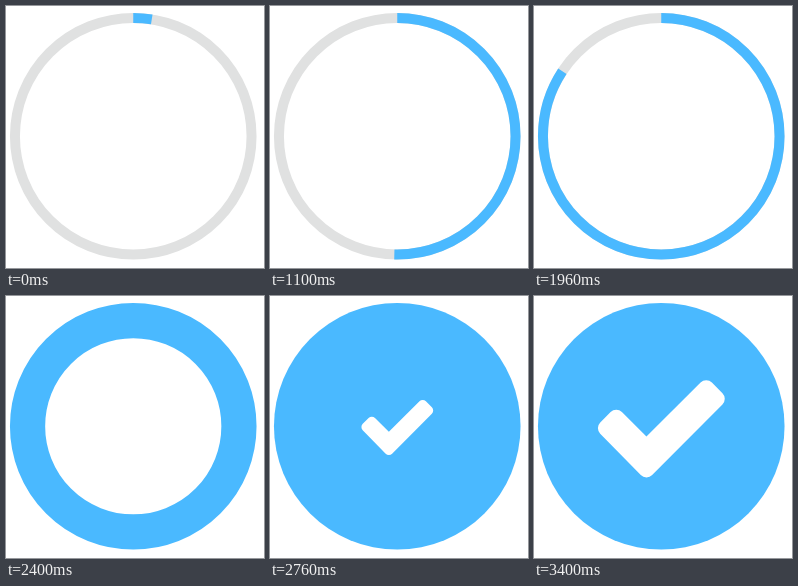
An HTML page with a canvas that plays this animation: 258 px wide and 262 px high, repeating every 3.42 s.

```html
<!DOCTYPE html>
<html lang="en">
<head>
<meta charset="utf-8">
<title>Progress ring</title>
<style>
  html, body { margin: 0; width: 100%; height: 100%; overflow: hidden; background: #fff; }
  canvas { display: block; }
</style>
</head>
<body>
<canvas id="stage" width="258" height="262"></canvas>
<script>
const ctx = document.getElementById('stage').getContext('2d');
const LOOP = 3420, STEP = 20;
const CX = 127.25, CY = 130.25, RADIUS = 123.3, LINE = 10;
const BLUE = '#4ab9ff', GRAY = '#e0e1e1';

// Corners relative to the scaling origin; the last one is the sharp inner angle.
const CHECK = [[-45, -19.4], [-66.6, 2.2], [-14.8, 55], [66.8, -27], [45, -49], [-14.8, 10.6]];
const CORNER = 8;

const clamp = x => Math.min(1, Math.max(0, x));
const phase = (t, start, end) => clamp((t - start) / (end - start));
const mix = (a, b, k) => a + (b - a) * k;
const easeOut = k => Math.sin(k * Math.PI / 2);
const easeInOut = k => (1 - Math.cos(k * Math.PI)) / 2;

// Two half turns with a short rest between them.
function sweep(t) {
  return t < 1090 ? mix(9, 180, phase(t, 0, 1070)) : mix(180, 360, phase(t, 1090, 2360));
}

function checkScale(t) {
  return t < 2980
    ? 1.2 * easeOut(phase(t, 2660, 2980))
    : mix(1.2, 1, easeInOut(phase(t, 2980, 3200)));
}

function ring(color, degrees, thickness) {
  const start = -Math.PI / 2;
  ctx.beginPath();
  ctx.arc(CX, CY, RADIUS - thickness / 2, start, start + degrees * Math.PI / 180);
  ctx.lineWidth = thickness;
  ctx.strokeStyle = color;
  ctx.stroke();
}

function disc() {
  ctx.beginPath();
  ctx.arc(CX, CY, RADIUS, 0, Math.PI * 2);
  ctx.fillStyle = BLUE;
  ctx.fill();
}

function check(scale) {
  if (scale <= 0) return;
  ctx.save();
  ctx.translate(CX, 129.8);
  ctx.scale(scale, scale);
  ctx.beginPath();
  const last = CHECK.length - 1;
  ctx.moveTo(...CHECK[last]);
  for (let i = 0; i < last; i++) {
    ctx.arcTo(...CHECK[i], ...CHECK[i + 1], CORNER);
  }
  ctx.closePath();
  ctx.fillStyle = '#fff';
  ctx.fill();
  ctx.restore();
}

function draw(t) {
  ctx.fillStyle = '#fff';
  ctx.fillRect(0, 0, 258, 262);
  const degrees = sweep(t);
  const fill = easeOut(phase(t, 2360, 2640));
  if (degrees < 360) ring(GRAY, 360, LINE);
  if (fill < 1) ring(BLUE, degrees, mix(LINE, RADIUS, fill));
  else disc();
  check(checkScale(t));
}

const origin = performance.now();
function frame() {
  const t = (performance.now() - origin) % LOOP;
  draw(Math.floor(t / STEP) * STEP);
  requestAnimationFrame(frame);
}
frame();
</script>
</body>
</html>
```
